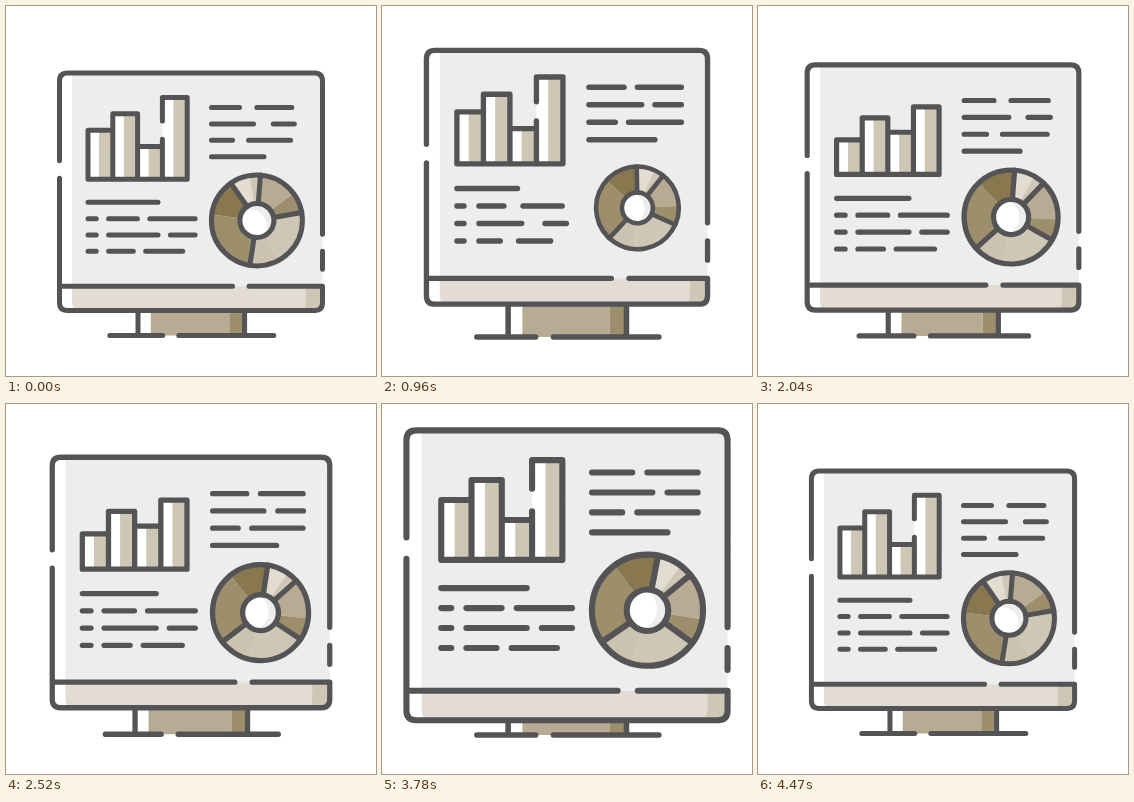
Write an HTML page that moves like this. It is 370x370 px and loops after 4500 ms.

```html
<!DOCTYPE html>
<html lang="en">
<head>
<meta charset="utf-8">
<title>Dashboard monitor</title>
<style>
  html, body { margin: 0; height: 100%; overflow: hidden; background: #fff; }
  svg { display: block; width: 100%; height: 100%; }
  .ink { fill: none; stroke: #545456; stroke-width: 5; stroke-linecap: round; stroke-linejoin: round; }
</style>
</head>
<body>
<svg viewBox="0 0 370 370">
  <defs>
    <clipPath id="case"><rect x="-131.5" y="-118.7" width="263" height="237.4" rx="8"/></clipPath>
    <clipPath id="hole"><circle r="17"/></clipPath>
  </defs>

  <g id="stand">
    <path fill="#fff" d="M-53.3-30h106.6v43.5h-106.6z"/>
    <path fill="#b8ab93" d="M-40.5-30H38V13.5h-78.5z"/>
    <path fill="#9d8f6c" d="M38-30h15.3v43.5H38z"/>
    <path class="ink" d="M-53.3-30V13.5M53.3-30V13.5M-81.5 13.5h53M-12.5 13.5h95"/>
  </g>

  <g id="screen">
    <g clip-path="url(#case)">
      <path fill="#fff" d="M-132-119h264v238h-264z"/>
      <path fill="#ecedef" d="M-119-119h251V94.5h-251z"/>
      <path fill="#e3dcd2" d="M-119 94.5h251V119h-243q-8 0-8-8z"/>
      <path fill="#cfc7b5" d="M115 94.5h17V119h-25q8 0 8-8z"/>
    </g>
    <path class="ink" d="M-131.5-31V-110.7q0-8 8-8h247q8 0 8 8V42.5M131.5 59.5V77.5
      M58 94.5h73.5v16.2q0 8-8 8h-247q-8 0-8-8V-13.5M-131.5 94.5h173"/>
    <g id="bars"></g>
    <path id="chart" class="ink"/>
    <path id="text" class="ink"/>
    <g id="donut">
      <g id="slices"></g>
      <g clip-path="url(#hole)">
        <circle r="17" fill="#ecedef"/>
        <circle r="17" cx="-7" cy="6" fill="#fff"/>
      </g>
      <path id="spokes" class="ink"/>
      <circle class="ink" r="45.5"/>
      <circle class="ink" r="17"/>
    </g>
  </g>
</svg>
<script>
const LOOP = 4500, BEAT = LOOP / 2;
const UNIT = 4.12, ROW = 16.35;      // grid shared by the text and the chart
const FLOOR = -12.6, BAR = 24.8;

const $ = id => document.getElementById(id);
const set = (id, name, value) => $(id).setAttribute(name, value);
const mix = (a, b, k) => a + (b - a) * k;

// Eased 0 to 1 between two times, and the same rise followed by a fall.
function ramp(t, from, to) {
  const u = Math.min(1, Math.max(0, (t - from) / (to - from)));
  return u < .5 ? 2 * u * u : 1 - 2 * (1 - u) ** 2;
}
const pulse = (t, a, b, c, d) => ramp(t, a, b) - ramp(t, c, d);

// Words are whole grid units long, three units apart, and shorten from the right.
const notes = [[8, 10], [12, 6], [6, 12], [15]];
const summary = [[17], [2, 7, 11], [2, 12, 6], [2, 6, 9]];

function paragraph(rows, left, top, stretch) {
  return rows.map((words, i) => {
    let x = left;
    return words.map(n => {
      const word = `M${x} ${top + i * ROW}h${n * UNIT * stretch}`;
      x += (n + 3) * UNIT;
      return word;
    }).join('');
  }).join('');
}

// Each slice darkens over its last third.
const slices = [
  { sweep: 39.5, tones: ['#e3ddd1', '#cfc7b5'] },
  { sweep: 75.5, tones: ['#b8ab93', '#9d8f6c'] },
  { sweep: 109, tones: ['#cfc7b5', '#cbc3b0'] },
  { sweep: 136, tones: ['#9d8f6c', '#88774f'] }
];
const polar = (deg, r) => {
  const a = deg * Math.PI / 180;
  return `${r * Math.sin(a)} ${-r * Math.cos(a)}`;
};
const wedge = (a, b, fill) =>
  `<path fill="${fill}" d="M0 0L${polar(a, 45.5)}A45.5 45.5 0 0 1 ${polar(b, 45.5)}z"/>`;

function buildDonut() {
  let angle = -35, fills = '', spokes = '';
  for (const { sweep, tones } of slices) {
    const split = angle + sweep * .65, end = angle + sweep;
    fills += wedge(angle, split, tones[0]) + wedge(split, end, tones[1]);
    spokes += `M${polar(angle, 17)}L${polar(angle, 45.5)}`;
    angle = end;
  }
  $('slices').innerHTML = fills;
  set('spokes', 'd', spokes);
}

// Bar heights in rows, before and after the data changes.
const before = [3, 4, 2, 5], after = [2.05, 3.35, 2.5, 4];
const barX = i => -103 + i * BAR;

function drawBars(k) {
  const tops = before.map((h, i) => FLOOR - mix(h, after[i], k) * ROW);
  $('bars').innerHTML = tops.map((y, i) =>
    `<path fill="#fff" d="M${barX(i)} ${y}h${BAR}V${FLOOR}h${-BAR}z"/>` +
    `<path fill="#cfc7b5" d="M${barX(i) + 11} ${y}h${BAR - 11}V${FLOOR}h${11 - BAR}z"/>`).join('');

  // The last bar's left side has a gap that closes as the data changes.
  const gap = 9.2 * (1 - k), middle = FLOOR - 3 * ROW;
  const side = i => i < 3 ? `M${barX(i)} ${FLOOR}V${Math.min(tops[i], tops[i - 1] ?? FLOOR)}`
    : `M${barX(i)} ${FLOOR}V${middle + gap}M${barX(i)} ${middle - gap}V${tops[i]}`;
  const outline = tops.map((y, i) => `${side(i)}M${barX(i)} ${y}h${BAR}`).join('');
  set('chart', 'd', `${outline}V${FLOOR}H${barX(0)}`);
}

function draw(t) {
  const p = t % BEAT;
  const grow = pulse(p, 0, 540, 1710, 2250);
  const squeeze = pulse(p, 620, 960, 990, 1260);
  const size = 1 + .11 * grow;
  const zoom = 1 - .037 * ramp(p, 250, 600) + .137 * ramp(p, 975, 1220) - .1 * ramp(p, 1530, 1850);
  const turn = 34 * ramp(t, 0, 600) + 12 * ramp(t, 960, 3240) - 46 * ramp(t, 3780, 4470);

  set('stand', 'transform', `translate(185.3 316) scale(${size})`);
  set('screen', 'transform', `translate(185 ${185.8 - 14.5 * grow}) scale(${size * zoom})`);
  set('donut', 'transform', `translate(65.9 28.6) rotate(${turn}) scale(${1 - .15 * squeeze})`);
  set('text', 'd',
    paragraph(notes, 20.5, -84.2, .85 + .15 * pulse(p, 0, 360, 1600, 2220)) +
    paragraph(summary, -103, 10.5, 1 - .19 * squeeze));
  drawBars(pulse(t, 900, 1400, 3150, 3650));
}

buildDonut();
const start = performance.now();
function frame() {
  draw((performance.now() - start) % LOOP);
  requestAnimationFrame(frame);
}
frame();
</script>
</body>
</html>
```
